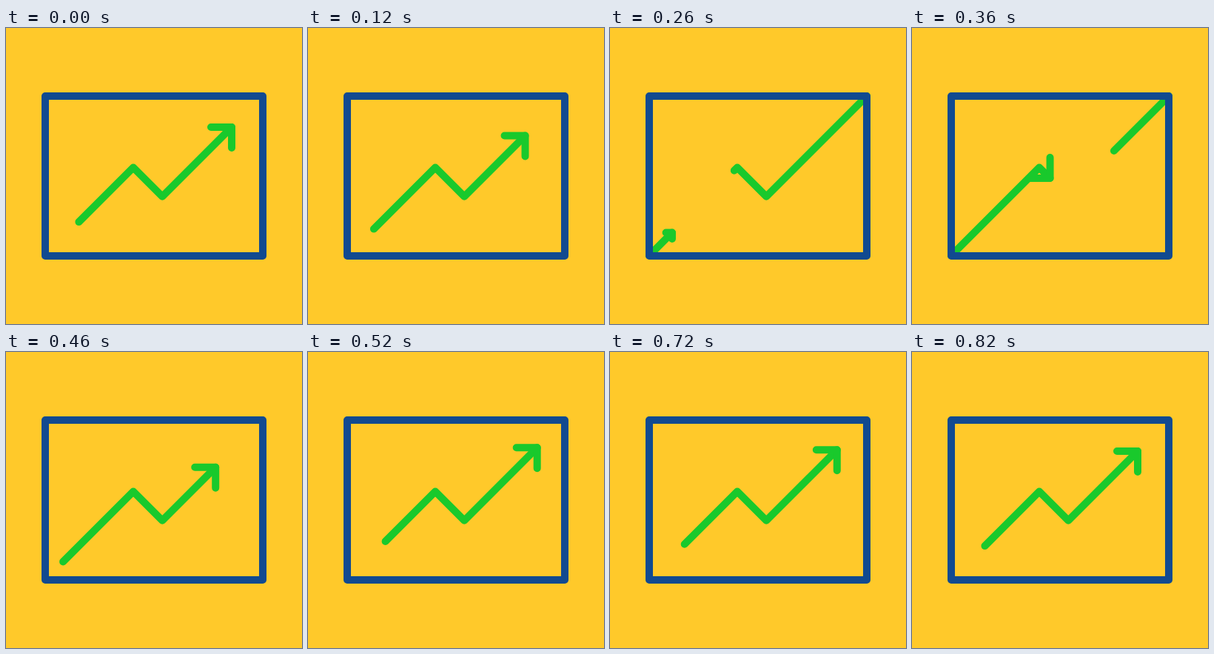
Recreate the animation shown at these times as an HTML page. Size 400x400 px, loop 840 ms.

```html
<!DOCTYPE html>
<html lang="en">
<head>
<meta charset="utf-8">
<title>Rising chart</title>
<style>
  html, body { margin: 0; width: 100%; height: 100%; overflow: hidden; background: #ffc92a; }
  svg { display: block; width: 100%; height: 100%; }
  path, rect { fill: none; stroke-width: 10; stroke-linecap: round; stroke-linejoin: round; }
  .line { stroke: #19c92c; }
  .frame { stroke: #114a90; }
</style>
</head>
<body>
<svg viewBox="0 0 400 400">
  <path class="line" id="line"/>
  <path class="line" id="head"/>
  <rect class="frame" x="53" y="92" width="294" height="216"/>
</svg>
<script>
const LOOP = 840;
const LEFT = 53, RIGHT = 347, SPAN = RIGHT - LEFT;
const PEAK = 172, DIP = 211.25;
const ARM = 28;
const line = document.getElementById('line');
const head = document.getElementById('head');

// Keys: time, tail travel, head travel, speed
const keys = [
  [0, 0, 0, 0],
  [120, -9.5, -11.5, 0],
  [260, 68.5, 72, 0.96],
  [360, 173.5, 174.5, 1.04],
  [460, 272, 271.5, 0.72],
  [540, 302, 300.3, 0],
  [820, SPAN, SPAN, 0]
];

const clamp = (v, lo, hi) => Math.min(hi, Math.max(lo, v));

// Hermite interpolation of one key column
function travel(t, col) {
  if (t >= 820) return SPAN;
  const i = keys.findIndex(k => k[0] > t);
  const a = keys[i - 1], b = keys[i];
  const d = b[0] - a[0], u = (t - a[0]) / d, v = 1 - u;
  return a[col] * v * v * (1 + 2 * u) + b[col] * u * u * (3 - 2 * u)
    + d * u * v * (a[3] * v - b[3] * u);
}

function chartY(x) {
  if (x < PEAK) return 360.5 - x;
  return x < DIP ? x + 16.5 : 439 - x;
}

const pathOf = xs => 'M' + xs.map(x => x.toFixed(2) + ' ' + chartY(x).toFixed(2)).join('L');

function section(from, to) {
  const a = Math.max(from, LEFT), b = Math.min(to, RIGHT);
  if (a >= b) return '';
  return pathOf([a, ...[PEAK, DIP].filter(x => x > a && x < b), b]);
}

function armLength(t) {
  return ARM * (t < 230 ? clamp((230 - t) / 60, 0, 1) : clamp((t - 231) / 100, 0, 1));
}

function draw(t) {
  const tail = 98.4 + travel(t, 1);
  const tip = 305 + travel(t, 2);
  line.setAttribute('d', section(tail, tip) + section(tail - SPAN, tip - SPAN));

  const x = tip > RIGHT ? tip - SPAN : tip;
  const y = chartY(x), n = armLength(t);
  const down = x >= PEAK && x < DIP;
  head.setAttribute('d', `M${x - n} ${y}L${x} ${y}L${x} ${y + (down ? -n : n)}`);
}

function tick() {
  draw(performance.now() % LOOP);
  requestAnimationFrame(tick);
}
tick();
</script>
</body>
</html>
```
